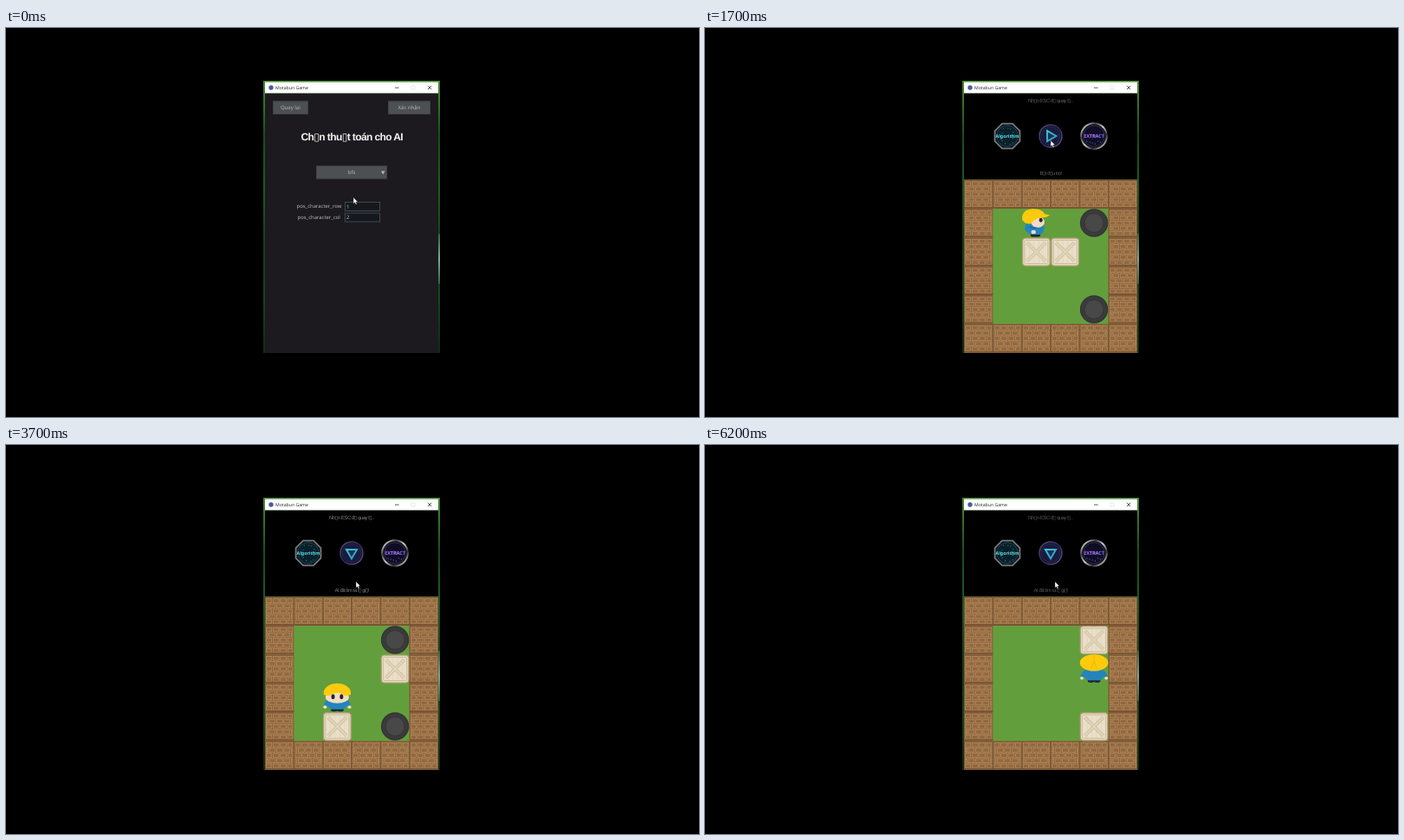
These frames come from a looping animation (800 by 450 pixels, 6300 ms). An HTML page with a canvas:

```html
<!DOCTYPE html>
<html lang="vi">
<head>
<meta charset="utf-8">
<title>Motabun Game</title>
<style>
  html, body { margin: 0; width: 100%; height: 100%; overflow: hidden; background: #000; }
  canvas { display: block; }
</style>
</head>
<body>
<canvas id="stage" width="800" height="450"></canvas>
<script>
const ctx = document.getElementById('stage').getContext('2d');
ctx.textRendering = 'geometricPrecision';

const LOOP = 6300, STEP = 100, GAME_START = 800, SOLVED = 2100;
const MOVES = 'DRLDLDRRURU', FIRST_MOVE = 2520, MOVE_GAP = 310;
const DIRS = { U: [0, -1], D: [0, 1], L: [-1, 0], R: [1, 0] };
const GOALS = [[4, 1], [4, 4]];
const LEFT = 299, TOP = 175.6, CELL = 33.35;
const UI = '"Noto Sans", sans-serif', NARROW = '"Liberation Sans", Arial, "DejaVu Sans", sans-serif';
// time, x, y
const POINTER = [[0, 401, 196], [150, 401, 196], [450, 466, 92], [650, 466, 92], [800, 461, 110],
  [1100, 461, 110], [1700, 399, 130], [2100, 400, 136], [2500, 401, 139], [2900, 404, 158], [LOOP, 404, 158]];

function rect(x, y, w, h, fill, stroke) {
  ctx.fillStyle = fill;
  ctx.fillRect(x, y, w, h);
  if (stroke) {
    ctx.strokeStyle = stroke;
    ctx.lineWidth = 0.8;
    ctx.strokeRect(x + 0.4, y + 0.4, w - 0.8, h - 0.8);
  }
}

function paint(fill, stroke, width = 1) {
  if (fill) { ctx.fillStyle = fill; ctx.fill(); }
  if (stroke) { ctx.strokeStyle = stroke; ctx.lineWidth = width; ctx.stroke(); }
}

function oval(x, y, rx, ry, fill, stroke, width) {
  ctx.beginPath();
  ctx.ellipse(x, y, rx, ry, 0, 0, 7);
  paint(fill, stroke, width);
}

function poly(points, fill, stroke, width) {
  ctx.beginPath();
  points.forEach(([x, y]) => ctx.lineTo(x, y));
  ctx.closePath();
  paint(fill, stroke, width);
}

function shape(path, fill, stroke, width) {
  const p = new Path2D(path);
  if (fill) { ctx.fillStyle = fill; ctx.fill(p); }
  if (stroke) { ctx.strokeStyle = stroke; ctx.lineWidth = width; ctx.stroke(p); }
}

function ngon(n, x, y, r, turn) {
  return Array.from({ length: n }, (_, i) => {
    const a = turn + i * 2 * Math.PI / n;
    return [x + r * Math.cos(a), y + r * Math.sin(a)];
  });
}

function label(text, x, y, font, fill, align = 'center', spacing = 0) {
  ctx.font = font;
  ctx.letterSpacing = spacing + 'px';
  ctx.textAlign = align;
  ctx.fillStyle = fill;
  ctx.fillText(text, x, y);
}

function gradient(x0, y0, x1, y1, ...colors) {
  const g = ctx.createLinearGradient(x0, y0, x1, y1);
  colors.forEach((c, i) => g.addColorStop(i / (colors.length - 1), c));
  return g;
}

function drawWindow() {
  rect(297, 61, 204, 315, gradient(0, 61, 0, 376, '#4c8a34', '#174d1c', '#1d5a20', '#143f1a', '#15451a', '#0f2c12'));
  rect(499, 238, 2, 58, gradient(0, 238, 0, 296, '#2a6a3a', '#7fa99a', '#2a6a3a'));
  rect(LEFT, 62.6, 200, 13, '#fff');
  oval(306, 69, 2.7, 2.7, '#4d5a98');
  label('Motabun Game', 311, 71.2, '5.2px "Open Sans", sans-serif', '#222', 'left');
  rect(449, 68.7, 4.6, 0.8, '#333');
  ctx.strokeStyle = '#ddd';
  ctx.lineWidth = 0.6;
  ctx.strokeRect(468, 67, 4, 4);
  shape('M487 66.8l4.2 4.2m0-4.2l-4.2 4.2', null, '#222', 0.8);
}

function drawMenu([px, py]) {
  const text = '#b4b8ba', font = '6px ' + UI;
  const button = (caption, x, y, w, h) => {
    const hover = px >= x && px <= x + w && py >= y && py <= y + h;
    rect(x, y, w, h, hover ? '#63686a' : '#4c5052', '#3e4244');
    label(caption, x + w / 2, y + h / 2 + 2.1, font, text);
  };
  const field = (name, value, y, right) => {
    label(name, right, y + 7.4, '5.9px ' + UI, text, 'right');
    rect(391, y, 41, 10.8, '#15191e', '#46535b');
    label(value, 393, y + 7.5, font, text, 'left');
  };
  rect(LEFT, 75.6, 200, 300.4, '#1c1a1e');
  button('Quay lại', 308, 84.5, 40.7, 15.5);
  button('Xác nhận', 441, 84.5, 49, 15.5);
  label('Ch▯n thu▯t toán cho AI', 399.3, 130, 'bold 12px ' + NARROW, '#f4f4f4', 'center', -0.6);
  button('bfs', 358, 159.5, 82, 15);
  poly([[433, 165.4], [437.4, 165.4], [435.2, 169.4]], text);
  field('pos_character_row', '1', 201, 387.3);
  field('pos_character_col', '2', 213.7, 385.8);
}

function drawButtons(solved) {
  const silver = gradient(436, 112, 462, 138, '#eee', '#444', '#ccc', '#333', '#ddd');
  poly(ngon(8, 349, 125, 15.6, Math.PI / 8), '#0a1219', '#77797d', 1.8);
  oval(349, 125, 12.2, 12.2, '#09202a', '#24505a', 0.8);
  for (let i = 0; i < 14; i++) {
    const a = i * 2.4, r = 7 + i % 4;
    oval(349 + r * Math.cos(a), 125 + r * Math.sin(a), 0.6, 0.6, '#2a8a96');
  }
  label('Algorithm', 349, 127, 'bold 5.3px ' + UI, '#5fe0ea');

  oval(399, 125, 13, 13, '#14122c', gradient(386, 112, 412, 138, '#5a5570', '#32265a', '#6a5a90'), 1.5);
  oval(399, 125, 10.8, 10.8, '#181c3c', '#2e2a5c', 0.8);
  poly(ngon(3, solved ? 399 : 398.5, solved ? 124.5 : 125, 7, solved ? Math.PI / 2 : 0), '#1a3252',
    gradient(392, 118, 406, 132, '#3ad0dc', '#3a8ec8'), 1.9);

  oval(449, 125, 14.8, 14.8, '#0a0818', silver, 2);
  oval(449, 125, 12.3, 12.3, '#100c26', '#3c3a52', 0.8);
  label('EXTRACT', 449, 127.2, 'bold 5.8px ' + UI, gradient(438, 0, 460, 0, '#9a5cf0', '#b08cff', '#6f6af0'), 'center', -0.25);
  for (let i = 0; i < 6; i++) oval(441 + i * 3.1, 131 + (i * 5) % 4, 0.5, 0.5, '#6ab0e8');
}

function drawWall() {
  rect(0, 0, CELL, CELL, '#845b3a');
  for (let row = 0; row < 5; row++) {
    for (let i = -1; i < 4; i++) {
      const x = i * 8.4 + (row % 2 ? 4.2 : 0) + 0.5, x0 = Math.max(x, 1.2), x1 = Math.min(x + 7.6, 32.2);
      if (x1 - x0 > 1) rect(x0, 1.8 + row * 6.1, x1 - x0, 5.4, '#93683f', '#b38a5c');
    }
  }
  rect(0, 31.4, CELL, 1.9, '#7b5434');
  rect(0, 0, 0.8, CELL, '#7b5434');
}

function drawGoal() {
  oval(16.7, 16.5, 16.2, 16.2, '#343434');
  oval(16.7, 16.5, 14.8, 14.8, '#3b3b3b');
  oval(16.7, 16.5, 11, 11, '#484848', '#2e2e2e', 0.7);
}

function drawCrate() {
  ctx.beginPath();
  ctx.roundRect(0.9, 0.8, 31.6, 32, 3.5);
  paint('#e5d9c0', '#b39d78', 1.2);
  ctx.beginPath();
  ctx.roundRect(3.2, 3.2, 27, 27, 1.5);
  paint('#e9dfca', '#cdbd9a', 1);
  for (let x = 8.5; x < 28; x += 5.4) rect(x, 4, 0.5, 25.4, '#dccfb2');
  shape('M6 6L27.4 27.4M27.4 6L6 27.4', null, '#cfc09c', 4);
  shape('M6 6L27.4 27.4M27.4 6L6 27.4', null, '#e0d4b8', 2.4);
}

function drawPlayer(facing) {
  const yellow = '#fdcb0c', blue = '#2484bd', skin = '#f3dcc3', dark = '#23282e';
  if (facing === 'L') { ctx.translate(CELL, 0); ctx.scale(-1, 1); }
  if (facing === 'L' || facing === 'R') {
    oval(13.5, 31, 3.5, 1.7, dark);
    oval(18, 31, 3.5, 1.7, dark);
    shape('M5 17Q1.5 24 6 27L10 30H21Q27 28 25.5 19Z', blue);
    oval(18.5, 15.5, 7.8, 6.3, skin);
    oval(22, 13.2, 2, 2.7, dark);
    shape('M9 21Q13 24 17 22', null, '#155b8b', 1);
    oval(13.5, 27, 2.7, 2.2, skin);
    shape('M0.5 13C-0.5 3 7 0 13 0.3C21 0.5 25 3 26 6L32.5 7.5Q28 11 21 10.5Q14 12 11 17Q5 19 0.5 13Z', yellow);
    return;
  }
  oval(13.2, 30.8, 4, 1.8, dark);
  oval(20.2, 30.8, 4, 1.8, dark);
  shape('M6 18Q0 23 1.5 27L6 26L9 30H24.5L27.5 26L32 27Q33 23 27.5 18Z', blue);
  oval(2.6, 27.5, 2, 1.8, skin);
  oval(30.8, 27.5, 2, 1.8, skin);
  if (facing === 'D') {
    oval(16.7, 16, 13.5, 7.2, skin);
    oval(11.8, 15.5, 2, 2.8, dark);
    oval(21.6, 15.5, 2, 2.8, dark);
    shape('M1 13C0 4 9 0 16.7 0S33.4 4 32.4 13Q25 16 22 12Q16.7 10 11.4 12Q8 16 1 13Z', yellow);
  } else {
    oval(16.7, 9.6, 16.3, 9.6, yellow);
    shape('M13 17L16.7 8L20.4 17M16.7 1V8', null, '#e3b20a', 0.8);
  }
}

function at(col, row, draw, arg) {
  ctx.save();
  ctx.translate(LEFT + col * CELL, TOP + row * CELL);
  draw(arg);
  ctx.restore();
}

function play(count) {
  const state = { x: 2, y: 1, facing: 'R', crates: [[2, 2], [3, 2]] };
  for (const move of MOVES.slice(0, count)) {
    const [dx, dy] = DIRS[move];
    state.x += dx;
    state.y += dy;
    state.facing = move;
    const crate = state.crates.find(([x, y]) => x === state.x && y === state.y);
    if (crate) { crate[0] += dx; crate[1] += dy; }
  }
  return state;
}

function drawGame(t) {
  const solved = t >= SOLVED;
  const phase = ((t + 200) % 1040) / 1040;
  const glow = 0.08 + 0.92 * (1 - Math.abs(1 - 2 * phase));
  const color = `rgba(235,235,235,${glow})`, font = '6px ' + NARROW;
  rect(LEFT, 75.6, 200, 100, '#000');
  label('Nh▯n ESC đ▯ quay l▯..', 398.8, 86.3, font, color, 'center', -0.45);
  label(solved ? 'AI đã tìm ra l▯ gi▯!' : 'B▯t đ▯u trò!', 399.2, 169.8, font, color, 'center', -0.45);
  drawButtons(solved);

  rect(LEFT, TOP, 200, 200.4, '#629f3c');
  for (let row = 0; row < 6; row++)
    for (let col = 0; col < 6; col++)
      if (row % 5 === 0 || col % 5 === 0) at(col, row, drawWall);

  const moves = Math.floor((t - FIRST_MOVE) / MOVE_GAP) + 1;
  const state = play(Math.max(0, Math.min(MOVES.length, moves)));
  GOALS.forEach(([x, y]) => at(x, y, drawGoal));
  state.crates.forEach(([x, y]) => at(x, y, drawCrate));
  at(state.x, state.y, drawPlayer, state.facing);
}

function pointerAt(t) {
  const i = POINTER.findIndex(p => p[0] > t);
  const [t0, x0, y0] = POINTER[i - 1], [t1, x1, y1] = POINTER[i];
  const k = (t - t0) / (t1 - t0), e = k * k * (3 - 2 * k);
  return [x0 + (x1 - x0) * e, y0 + (y1 - y0) * e];
}

function drawPointer([x, y]) {
  ctx.save();
  ctx.translate(x, y);
  shape('M0 0V7.2L1.7 5.7L2.8 8.2L4 7.7L2.9 5.2H5.1Z', '#fff', '#222', 0.4);
  ctx.restore();
}

function frame() {
  const t = Math.floor(performance.now() % LOOP / STEP) * STEP;
  const pointer = pointerAt(t);
  rect(0, 0, 800, 450, '#000');
  drawWindow();
  if (t < GAME_START) drawMenu(pointer);
  else drawGame(t);
  drawPointer(pointer);
  requestAnimationFrame(frame);
}
frame();
</script>
</body>
</html>
```
